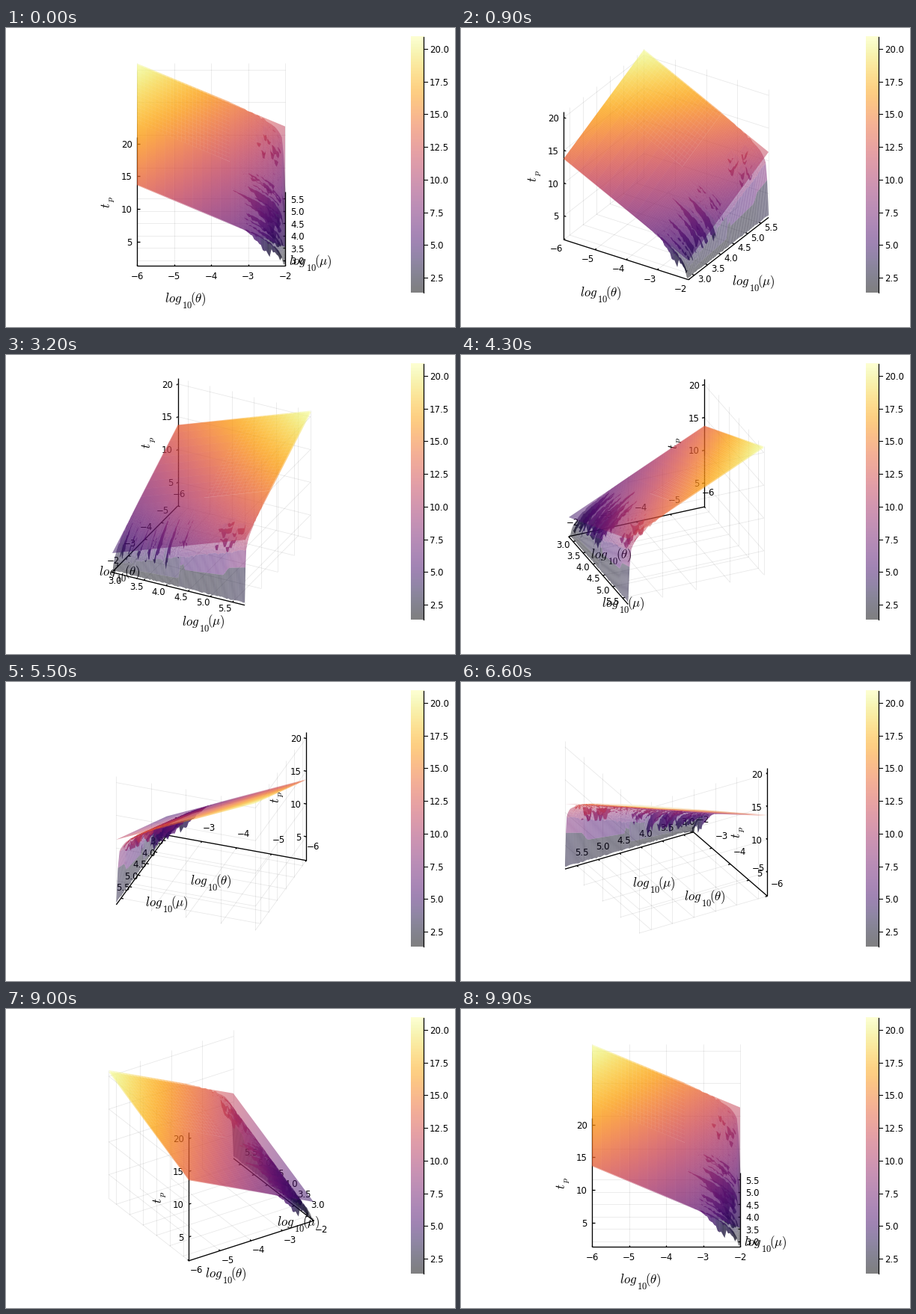
Recreate the animation shown at these times as a matplotlib script. Size 600 by 400 pixels, loop 10000 ms.

```python
import numpy as np
import matplotlib
import matplotlib.pyplot as plt
from matplotlib.animation import FuncAnimation
from matplotlib.collections import LineCollection, PolyCollection
from matplotlib.transforms import Affine2D

matplotlib.rcParams["mathtext.fontset"] = "cm"
matplotlib.rcParams["font.family"] = "DejaVu Sans"

FRAMES = 100
T0, T1 = -6.0, -2.0           # log10(theta)
M0, M1 = 2.778, 5.778         # log10(mu)
Z0, Z1 = 1.36, 20.93
T_SCAN, M_SCAN = -3.5, 4.301  # corner of the coarsely sampled patch
CX, CY, HALF = 274.25, 182.6, 99.0
COS_EL, SIN_EL = np.cos(np.pi / 6), 0.5
CMAP = plt.get_cmap("inferno")

T_TICKS = np.arange(-6, -1)
M_TICKS = np.arange(3.0, 5.6, 0.5)
Z_TICKS = np.arange(5, 21, 5)


def unit(v, lo, hi):
    return 2 * (np.asarray(v, float) - lo) / (hi - lo) - 1


def project(t, m, z, a):
    """Orthographic projection to pixels, y pointing down."""
    x, y, h = unit(t, T0, T1), unit(m, M0, M1), unit(z, Z0, Z1)
    c, s = np.cos(a), np.sin(a)
    sx = CX + HALF * (c * x + s * y)
    sy = CY - HALF * (SIN_EL * (c * y - s * x) + COS_EL * h)
    return np.stack(np.broadcast_arrays(sx, sy), axis=-1)


def colours(z):
    rgba = CMAP((np.asarray(z) - Z0) / (Z1 - Z0))
    rgba[..., 3] = 0.5
    return rgba


def theory(t, m):
    return 4.25 + 2.35 * ((m - M0) - (t - T1))


def smooth(t, m):
    return theory(t, m) + 0.1 + 0.045 * (m - M0)


def simulated(t, m):
    """Smooth surface with a fall-off near theta = -2 and random pits."""
    rng = np.random.default_rng(11)
    tt, mm = np.meshgrid(t, m, indexing="ij")
    z = smooth(tt, mm) + 1.3 * np.log(np.maximum(1 - 10 ** (tt - T1), 1e-3))
    n, k = z.shape
    z -= 0.35 * np.clip(tt - T_SCAN, 0, 1) * rng.random((n, k)) ** 3
    for _ in range(32):
        j = rng.integers(1, int(0.6 * k))
        end = n - 2 - rng.integers(0, 9)
        start = max(end - rng.integers(6, 24), n - 31)
        size = end - start
        depth = rng.uniform(0.4, 1.7) * np.linspace(0.2, 1, size)
        z[start:end, j] -= depth * rng.uniform(0.5, 1, size)
    for _ in range(14):
        j = rng.integers(int(0.74 * k), int(0.9 * k))
        i = n - rng.integers(5, 18)
        z[i:i + 2, j:j + rng.integers(2, 5)] -= rng.uniform(0.4, 1.2)
    ledge = np.interp(m - M0, [0, 1.45, 1.5, 1.55, 1.62, 2.5, 2.62, 3],
                      [2.2, 2.8, 3, 7, 4.3, 5, 6.3, 7])
    z[-2] = np.minimum(z[-2], ledge)
    z[-1] = 1.6 + rng.uniform(0, 0.2, k)
    return np.maximum(z, 1.5)


class Mesh:
    """Translucent quads, painted from back to front."""

    def __init__(self, ax, t, m, z, zorder, seam="none", hole=False):
        self.t, self.m, self.z = t[:, None], m[None, :], z
        corners = np.stack([z[1:, 1:], z[:-1, 1:], z[1:, :-1], z[:-1, :-1]])
        tc, mc = np.meshgrid((t[1:] + t[:-1]) / 2, (m[1:] + m[:-1]) / 2,
                             indexing="ij")
        keep = np.ones(tc.shape, bool)
        if hole:
            keep = (tc > T_SCAN) | (mc < M_SCAN)
        self.keep = keep
        self.rgba = colours((corners.mean(0) + corners.min(0)) / 2)[keep]
        self.x, self.y = unit(tc[keep], T0, T1), unit(mc[keep], M0, M1)
        self.poly = PolyCollection([], edgecolors=seam, zorder=zorder,
                                   linewidths=0 if seam == "none" else 0.4)
        ax.add_collection(self.poly, autolim=False)

    def update(self, a):
        p = project(self.t, self.m, self.z, a)
        quads = np.stack([p[:-1, :-1], p[1:, :-1], p[1:, 1:], p[:-1, 1:]], 2)
        order = np.argsort(np.sin(a) * self.x - np.cos(a) * self.y,
                           kind="stable")
        self.poly.set_verts(quads[self.keep][order])
        self.poly.set_facecolor(self.rgba[order])


fig = plt.figure(figsize=(6, 4), dpi=100, facecolor="white")
ax = fig.add_axes([0, 0, 1, 1])

# Colour bar
bar = colours(np.linspace(Z1, Z0, 343))[:, None, :]
ax.imshow(bar, extent=(540.5, 558, 354, 11.5), aspect="auto", origin="upper")
ax.plot([558, 558], [11.5, 354], color="black", lw=0.9)
for v in np.arange(2.5, 20.1, 2.5):
    y = 354 - (v - Z0) / (Z1 - Z0) * 342.5
    ax.plot([558, 563], [y, y], color="black", lw=0.8)
    ax.text(566, y, f"{v:.1f}", size=8.5, va="center_baseline")

# The theory surface is flat, so one gradient under an affine map is enough
g = (np.arange(160) + 0.5) / 160
flat = colours(theory(T0 + (T1 - T0) * g[None, :], M0 + (M1 - M0) * g[:, None]))
plane = ax.imshow(flat, extent=(0, 1, 0, 1), origin="lower", aspect="auto",
                  interpolation="bilinear", zorder=6)

t_sim = np.r_[np.linspace(T0, T_SCAN, 11), np.linspace(T_SCAN, T1, 33)[1:]]
m_sim = np.r_[np.linspace(M0, M_SCAN, 42), np.linspace(M_SCAN, M1, 41)[1:]]
t_scan, m_scan = np.linspace(T0, T_SCAN, 26), np.linspace(M_SCAN, M1, 16)
meshes = [Mesh(ax, t_sim, m_sim, simulated(t_sim, m_sim), 4, hole=True),
          Mesh(ax, t_scan, m_scan, smooth(t_scan[:, None], m_scan), 5,
               seam=(1, 1, 1, 0.15))]

grid = LineCollection([], colors="black", alpha=0.09, linewidths=0.6, zorder=1)
axes = LineCollection([], colors="black", linewidths=0.95, zorder=2)
ax.add_collection(grid, autolim=False)
ax.add_collection(axes, autolim=False)


def label(s, size=8.5, **kw):
    style = dict(ha="center", va="center_baseline", size=size, zorder=3)
    return ax.text(0, 0, s, **{**style, **kw})


t_labels = [label(f"\u2212{-v}") for v in T_TICKS]
m_labels = [label(f"{v:.1f}") for v in M_TICKS]
z_labels = [label(str(v), ha="right") for v in Z_TICKS]


def log_title(symbol):
    """Pieces of a title with their offsets from its centre."""
    kw = dict(ha="left", va="baseline")
    return [(label("$log$", 12.2, **kw), -27, 4.5),
            (label("$10$", 9, **kw), -4, 12.5),
            (label(f"$({symbol})$", 12.2, **kw), 7, 4.5)]


t_title, m_title = log_title(r"\theta"), log_title(r"\mu")
z_title = [(label("$t$", 12.2, rotation=90, va="center"), -4, 4.5),
           (label("$p$", 8.6, rotation=90, va="center"), 3, -4)]

ax.set_xlim(0, 600)
ax.set_ylim(400, 0)
ax.axis("off")

GRID = ([((t, M0, Z0), (t, M1, Z0)) for t in T_TICKS]
        + [((t, M1, Z0), (t, M1, Z1)) for t in T_TICKS]
        + [((T0, m, Z0), (T1, m, Z0)) for m in M_TICKS]
        + [((T0, m, Z0), (T0, m, Z1)) for m in M_TICKS]
        + [((T0, M1, z), (T1, M1, z)) for z in Z_TICKS]
        + [((T0, M0, z), (T0, M1, z)) for z in Z_TICKS])
AXES = ([((T0, M0, Z0), (T1, M0, Z0)),
         ((T1, M0, Z0), (T1, M1, Z0)),
         ((T0, M0, Z0), (T0, M0, Z1))]
        + [((t, M0, Z0), (t, M0 + 0.05, Z0)) for t in T_TICKS]
        + [((T1, m, Z0), (T1 - 0.07, m, Z0)) for m in M_TICKS]
        + [((T0, M0, z), (T0 + 0.07, M0, z)) for z in Z_TICKS])
GRID, AXES = np.array(GRID), np.array(AXES)


def segments(lines, a):
    return project(lines[..., 0], lines[..., 1], lines[..., 2], a)


def t_offset(deg):
    c = np.cos(np.radians(deg))
    if 90 < deg < 270:
        return 2 + 0.0875 * (deg - 116), -14.5 + 5.7 * c
    side = (deg > 180) - (0 < deg <= 90)
    return side * (7.5 + 0.08 * min(deg, 360 - deg)), 13.7 * c - 0.3


def m_offset(deg):
    s = np.sin(np.radians(deg))
    if deg <= 90:
        return 16 - 0.083 * deg, 0.5 + 7.5 * s
    if deg <= 180:
        return -15 + 0.083 * (180 - deg), 0.5 + 7.5 * s
    return 16 - 0.083 * (360 - deg), -12.9 + 6.4 * s


def place(labels, points, offset):
    for text, p in zip(labels, points):
        text.set_position(p + np.array(offset))


def place_title(parts, point, offset):
    for text, dx, dy in parts:
        text.set_position((point[0] + offset[0] + dx, point[1] + offset[1] + dy))


def update(i):
    deg = (360 * i / (FRAMES - 1)) % 360
    a = np.radians(deg)
    grid.set_segments(segments(GRID, a))
    axes.set_segments(segments(AXES, a))

    place(t_labels, project(T_TICKS, M0, Z0, a), t_offset(deg))
    place(m_labels, project(T1, M_TICKS, Z0, a), m_offset(deg))
    place(z_labels, project(T0, M0, Z_TICKS, a), (-6.5, 0))
    place_title(t_title, project((T0 + T1) / 2, M0, Z0, a), (-34.8, 44.4))
    place_title(m_title, project(T1, (M0 + M1) / 2, Z0, a), (31.5, 44.4))
    place_title(z_title, project(T0, M0, (Z0 + Z1) / 2, a), (-37.5, 0.4))

    for mesh in meshes:
        mesh.update(a)
    o, u, v = (project(t, m, theory(t, m), a)
               for t, m in ((T0, M0), (T1, M0), (T0, M1)))
    (ux, uy), (vx, vy) = u - o, v - o
    tilt = Affine2D(np.array([[ux, vx, o[0]], [uy, vy, o[1]], [0, 0, 1]]))
    plane.set_transform(tilt + ax.transData)
    return []


anim = FuncAnimation(fig, update, frames=FRAMES, interval=100, repeat=True,
                     repeat_delay=0, blit=False)
plt.show()
```
